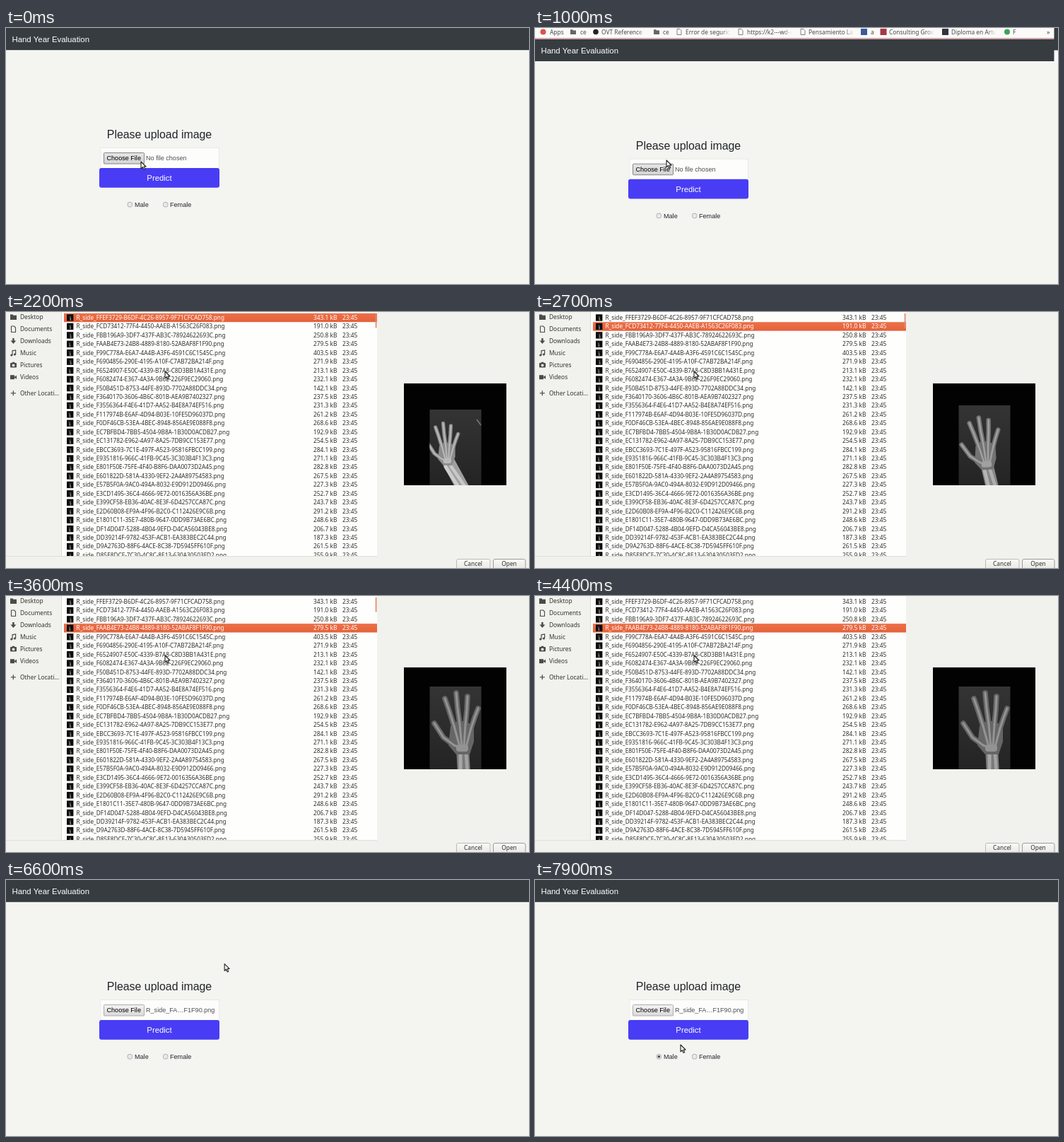
Recreate the animation shown at these times as an HTML page with a canvas. Size 740 by 362 pixels, loop 8 s.

```html
<!DOCTYPE html>
<html lang="en">
<head>
<meta charset="utf-8">
<title>Upload form</title>
<style>
html, body { margin: 0; width: 100%; height: 100%; overflow: hidden; background: #f4f4f1; }
canvas { display: block; width: 740px; height: 362px; }
</style>
</head>
<body>
<canvas id="stage"></canvas>
<script>
const W = 740, H = 362, LOOP = 8000, STEP = 100;
const WEB = '"Liberation Sans", Arial, sans-serif';
const UI = '"Noto Sans", "Open Sans", sans-serif';
const canvas = document.getElementById('stage');
const ctx = canvas.getContext('2d');
const dpr = window.devicePixelRatio || 1;
canvas.width = W * dpr;
canvas.height = H * dpr;

const FILES = `FFEF3729-B6DF-4C26-8957-9F71CFCAD758 343.1
FCD73412-77F4-4450-AAEB-A1563C26F083 191.0
FBB196A9-3DF7-437F-AB3C-78924622693C 250.8
FAAB4E73-24B8-4889-8180-52ABAF8F1F90 279.5
F99C778A-E6A7-4A4B-A3F6-4591C6C1545C 403.5
F6904856-290E-4195-A10F-C7AB72BA214F 271.9
F6524907-E50C-4339-B7A8-C8D3BB1A431E 213.1
F6082474-E367-4A3A-9B6E-226F9EC29060 232.1
F50B451D-8753-44FE-893D-7702A88DDC34 142.1
F3640170-3606-4B6C-801B-AEA9B7402327 237.5
F3556364-F4E6-41D7-AA52-B4E8A74EF516 231.3
F117974B-E6AF-4D94-B03E-10FE5D96037D 261.2
F0DF46CB-53EA-4BEC-8948-856AE9E088F8 268.6
EC7BFBD4-7BB5-4504-9B8A-1B30D0ACDB27 192.9
EC131782-E962-4A97-8A25-7DB9CC153E77 254.5
EBCC3693-7C1E-497F-A523-95816FBCC199 284.1
E9351816-966C-41FB-9C45-3C303B4F13C3 271.1
E801F50E-75FE-4F40-B8F6-DAA0073D2A45 282.8
E601822D-581A-4330-9EF2-2A4A89754583 267.5
E57B5F0A-9AC0-494A-8032-E9D912D09466 227.3
E3CD1495-36C4-4666-9E72-0016356A36BE 252.7
E399CF58-EB36-40AC-8E3F-6D4257CCA87C 243.7
E2D60B08-EF9A-4F96-B2C0-C112426E9C6B 291.2
E1801C11-35E7-480B-9647-0DD9B73AE6BC 248.6
DF14D047-5288-4B04-9EFD-D4CA56043BE8 206.7
DD39214F-9782-453F-ACB1-EA383BEC2C44 187.3
D9A2763D-88F6-4ACE-8C38-7D5945FF610F 261.5
D85E8DCE-7C30-4C8C-8E13-630A30503FD2 255.9`.split('\n').map(s => s.split(' '));

// Pointer path: time, x, y
const PATH = [
  [0, 191, 189], [400, 266, 208], [700, 226, 162], [900, 186, 187],
  [1500, 186, 187], [2100, 225, 84], [5100, 225, 84], [6000, 261, 40],
  [6400, 261, 40], [6700, 326, 146], [6800, 326, 146], [7500, 176, 248],
  [7700, 176, 248], [7800, 217, 207], [7900, 206, 233]
];

// One x-ray pose for each selectable row
const POSES = [
  { x: 624, y: 203, turn: 0, size: 0.68, wrist: [648, 252], top: 138, tone: 150 },
  { x: 638, y: 206, turn: -0.06, size: 0.85, wrist: [648, 252], top: 132, tone: 125 },
  { x: 638, y: 207, turn: 0.05, size: 0.9, wrist: [636, 252], top: 130, tone: 120 },
  { x: 645, y: 204, turn: 0, size: 1, wrist: [648, 252], top: 128, tone: 112 }
];
const FINGERS = [
  [-11, 7, -26, -4, -39, -24], [-11, -20, -18, -42, -24, -59],
  [-3, -23, -6, -45, -8, -67], [5, -22, 7, -43, 8, -62],
  [13, -17, 18, -32, 23, -45]
];

function rect(x, y, w, h, fill) {
  ctx.fillStyle = fill;
  ctx.fillRect(x, y, w, h);
}

function box(x, y, w, h, r, fill, stroke) {
  ctx.beginPath();
  ctx.roundRect(x, y, w, h, r);
  ctx.fillStyle = fill;
  ctx.fill();
  if (stroke) {
    ctx.strokeStyle = stroke;
    ctx.lineWidth = 1;
    ctx.stroke();
  }
}

function disc(x, y, r, fill) {
  ctx.beginPath();
  ctx.arc(x, y, r, 0, Math.PI * 2);
  ctx.fillStyle = fill;
  ctx.fill();
}

function text(s, x, y, size, fill, font = WEB, align = 'left') {
  ctx.font = `${size}px ${font}`;
  ctx.textAlign = align;
  ctx.fillStyle = fill;
  ctx.fillText(s, x, y);
}

function shape(points, fill) {
  ctx.beginPath();
  for (let i = 0; i < points.length; i += 2) ctx.lineTo(points[i], points[i + 1]);
  ctx.closePath();
  ctx.fillStyle = fill;
  ctx.fill();
}

function line(points, width, stroke) {
  ctx.beginPath();
  for (let i = 0; i < points.length; i += 2) ctx.lineTo(points[i], points[i + 1]);
  ctx.lineWidth = width;
  ctx.strokeStyle = stroke;
  ctx.stroke();
}

function fade(y0, y1, a, b) {
  const g = ctx.createLinearGradient(0, y0, 0, y1);
  g.addColorStop(0, a);
  g.addColorStop(1, b);
  return g;
}

const grey = v => `rgb(${v}, ${v}, ${v})`;

function radio(x, y, on) {
  disc(x, y, 3.7, '#a2a2a2');
  disc(x, y, 3, '#e9e9e9');
  if (on) disc(x, y, 1.8, '#4a4a4a');
}

function page(top, file, hover, male) {
  rect(0, 0, W, H, '#f4f4f1');
  ctx.save();
  ctx.translate(0, top);
  rect(0, 0, W, 31.5, '#373c40');
  rect(0, 31.5, W, 1.5, '#fbfbfa');
  text('Hand Year Evaluation', 8.5, 19.8, 11.36, '#fff');
  text('Please upload image', 217, 156, 15.9, '#212529', WEB, 'center');

  box(133.5, 169.5, 168, 30, 2, '#fdfdfc');
  ctx.setLineDash([1, 1]);
  line([134, 198, 134, 169.5, 301.5, 169.5, 301.5, 198], 1, '#d9d9d6');
  ctx.setLineDash([]);
  box(138.5, 176.5, 57, 15.5, 1,
    hover ? fade(176, 192, '#e6e6e6', '#d4d4d4') : fade(176, 192, '#f4f4f4', '#dadada'),
    hover ? '#858585' : '#acacac');
  text('Choose File', 142.5, 187, 9.09, '#000');
  text(file, 198, 187, 9.09, '#4c5054');
  box(132, 198, 170, 27.7, 3, '#483df4');
  text('Predict', 217, 216, 11.36, '#fff', WEB, 'center');
  radio(175.3, 249.8, male);
  text('Male', 182, 253.3, 9.09, '#212529');
  radio(225.7, 249.8, false);
  text('Female', 232, 253.3, 9.09, '#212529');
  ctx.restore();
}

function folder(x, y) {
  rect(x, y, 3.5, 2, '#666');
  rect(x, y + 1.2, 8, 5.6, '#666');
}

function sheet(x, y) {
  line([x, y, x + 4, y, x + 6, y + 2, x + 6, y + 8, x, y + 8, x, y], 0.8, '#666');
}

function bookmark(s, x, end) {
  const g = ctx.createLinearGradient(end - 12, 0, end, 0);
  g.addColorStop(0, '#4a4a4a');
  g.addColorStop(1, 'rgba(74,74,74,0)');
  ctx.save();
  ctx.beginPath();
  ctx.rect(x, 0, end - x, 14);
  ctx.clip();
  text(s, x, 9, 8.4, g, UI);
  ctx.restore();
}

function bookmarks() {
  rect(0, 0, W, 14, '#fbfaf9');
  rect(0, 14, W, 1.5, '#dba0a4');
  rect(734.5, 0, 6, 31.5, '#373c40');
  rect(734.5, 31.5, 6, 16, '#fafaf8');
  disc(11.5, 5.5, 4, '#d9534a');
  text('Apps', 21, 9, 8.4, '#4a4a4a', UI);
  folder(50, 2.2);
  folder(168, 2.2);
  for (const x of [64, 181]) text('ce', x, 9, 8.4, '#4a4a4a', UI);
  disc(86, 5.5, 3.8, '#222');
  bookmark('OVT Reference', 94, 157);
  sheet(201, 1.5);
  bookmark('Error de seguridad', 213, 276);
  sheet(288, 1.5);
  bookmark('https://k2---wd-q', 300, 363);
  sheet(376, 1.5);
  bookmark('Pensamiento La', 387, 451);
  rect(461, 1, 9, 9, '#3b5998');
  text('a', 475, 9, 8.4, '#4a4a4a', UI);
  rect(488.5, 1, 9, 9, '#a33a44');
  bookmark('Consulting Group', 501, 565);
  rect(576, 1, 9, 9, '#2e3440');
  bookmark('Diploma en Artes', 589, 652);
  disc(668, 5.5, 4, '#3aa657');
  text('F', 676, 9, 8.4, '#4a4a4a', UI);
  text('»', 724, 9, 9, '#444', UI);
}

function sidebar() {
  const ink = '#4b4b49';
  const names = ['Desktop', 'Documents', 'Downloads', 'Music', 'Pictures', 'Videos'];
  names.forEach((s, i) => text(s, 20, 10.3 + i * 17, 8.4, '#333331', UI));
  text('Other Locati…', 20, 117.8, 8.4, '#333331', UI);
  rect(6, 3.5, 4, 2, ink);
  rect(6, 4.7, 9, 6.3, ink);
  line([7.5, 20, 11.5, 20, 13.5, 22, 13.5, 28.5, 7.5, 28.5, 7.5, 20], 1.1, ink);
  rect(9.2, 37, 2.4, 4, ink);
  shape([6.5, 40.5, 14.3, 40.5, 10.4, 45], ink);
  line([9, 61, 9, 54.8, 13.6, 54, 13.6, 60], 1.2, ink);
  disc(7.8, 61, 1.6, ink);
  disc(12.4, 60, 1.6, ink);
  box(6, 72, 9, 6.6, 1, ink);
  rect(8.7, 70.8, 3.5, 2, ink);
  disc(10.5, 75.3, 1.9, '#f0f0ec');
  rect(6, 89.2, 6, 6, ink);
  shape([11.5, 92.2, 15, 89.5, 15, 95], ink);
  line([6.8, 114.8, 13.8, 114.8], 1.2, ink);
  line([10.3, 111.3, 10.3, 118.3], 1.2, ink);
}

function thumb(i, y) {
  rect(86, y - 4.7, 9.4, 9.4, '#0c0c0c');
  const r = Math.abs(Math.sin(i * 12.9 + 2) * 43.7) % 1;
  const x = 90 + r * 1.4;
  line([x + 0.4, y + 4, x, y], 1.8, '#777');
  line([x - 1.4, y - 2, x, y, x + 0.5, y - 2.4], 0.9, '#5e5e5e');
}

function list(selected, scrollbar) {
  rect(79, 0, 446, 345, '#fefefd');
  rect(78, 0, 1, 345, '#dcdbd7');
  ctx.save();
  ctx.beginPath();
  ctx.rect(79, 0, 446, 345);
  ctx.clip();
  FILES.forEach(([id, size], i) => {
    const y = 8 + i * 12.44, on = i === selected;
    if (on) rect(82, y - 6.2, 443, 12.4, fade(y - 6, y + 6, '#ec7048', '#e4623b'));
    const ink = on ? '#fff' : '#2f2f2d';
    thumb(i, y);
    text(`R_side_${id}.png`, 99.5, y + 3, 8.24, ink, UI);
    text(`${size} kB`, 435, y + 3, 8.36, ink, UI);
    text('23:45', 476, y + 3, 8.36, ink, UI);
  });
  ctx.restore();
  if (scrollbar) rect(522.7, 2, 1.8, 20.5, '#e28b6c');
}

function xray(p) {
  rect(563, 101, 145, 144, '#020202');
  ctx.save();
  ctx.beginPath();
  ctx.rect(599.5, p.top, 73, 245 - p.top);
  ctx.clip();
  rect(599, p.top, 75, 120, fade(p.top, 245, '#343434', '#242424'));
  if (p === POSES[0]) line([666, 152, 672, 160], 1.5, '#777');
  ctx.lineCap = ctx.lineJoin = 'round';
  const flesh = grey(p.tone - 10), bone = grey(p.tone + 35);
  const [wx, wy] = p.wrist;
  const armY = p.y + 10 * p.size;
  line([p.x + 1, armY, wx, wy], 18, grey(p.tone + 10));
  line([p.x - 2, armY + 9, wx - 5, wy], 5, grey(p.tone + 55));
  line([p.x + 6, armY + 9, wx + 5, wy], 4.5, grey(p.tone + 50));
  ctx.translate(p.x, p.y);
  ctx.rotate(p.turn);
  ctx.scale(p.size, p.size);
  for (const f of FINGERS) line(f, 7.6, flesh);
  shape([-16, -20, -7, -27, 6, -27, 17, -19, 17, 2, 11, 20, -8, 20, -19, 7], flesh);
  FINGERS.forEach((f, i) => {
    line(f, 3, bone);
    line([i * 3 - 6, 9, f[0], f[1]], 3, bone);
  });
  box(-8, 6, 17, 10, 4, bone);
  ctx.restore();
}

function dialog(selected, pressed, scrollbar) {
  rect(0, 0, W, H, '#f1f1ed');
  sidebar();
  list(selected, scrollbar);
  xray(POSES[selected]);
  rect(0, 345, 525, 1, '#e0dfdb');
  const face = fade(349, 362, '#fafaf8', '#ebeae7');
  box(637.5, 349.5, 47.5, 18, 2.5, face, '#bcbab5');
  box(689.5, 349.5, 45.5, 18, 2.5, pressed ? '#d5d4d0' : face, '#9c9a95');
  text('Cancel', 661, 359.2, 8.4, '#333331', UI, 'center');
  text('Open', 712, 359.2, 8.4, '#333331', UI, 'center');
}

function pointer(t) {
  let i = 0;
  while (i < PATH.length - 2 && t >= PATH[i + 1][0]) i++;
  const [t0, x0, y0] = PATH[i], [t1, x1, y1] = PATH[i + 1];
  const k = Math.min(1, (t - t0) / (t1 - t0));
  const e = k * k * (3 - 2 * k);
  ctx.save();
  ctx.translate(x0 + (x1 - x0) * e, y0 + (y1 - y0) * e);
  ctx.beginPath();
  for (const [x, y] of [[0, 0], [0, 9.8], [2.4, 7.7], [4, 11.4], [5.7, 10.6], [4.1, 7.1], [7.1, 7]]) ctx.lineTo(x, y);
  ctx.closePath();
  ctx.lineJoin = 'round';
  ctx.fillStyle = '#f6f6f6';
  ctx.fill();
  ctx.lineWidth = 1.1;
  ctx.strokeStyle = '#222';
  ctx.stroke();
  ctx.restore();
}

function draw(t) {
  ctx.setTransform(dpr, 0, 0, dpr, 0, 0);
  const picked = t >= 6100;
  const name = picked ? 'R_side_FA…F1F90.png' : 'No file chosen';
  if (t >= 1100 && !picked) {
    const row = Math.max(0, Math.min(3, Math.floor((t - 2300) / 300)));
    // The overlay scrollbar hides while nothing moves
    dialog(row, t >= 5900, t < 4200 || t >= 5200);
  } else {
    const barred = t >= 1000 && t < 6200;
    page(barred ? 15.7 : 0, name, !picked, t >= 7500);
    if (barred) bookmarks();
  }
  pointer(t);
}

const start = performance.now();
function tick() {
  const t = Math.max(0, performance.now() - start) % LOOP;
  draw(Math.floor(t / STEP) * STEP);
  requestAnimationFrame(tick);
}
tick();
</script>
</body>
</html>
```
